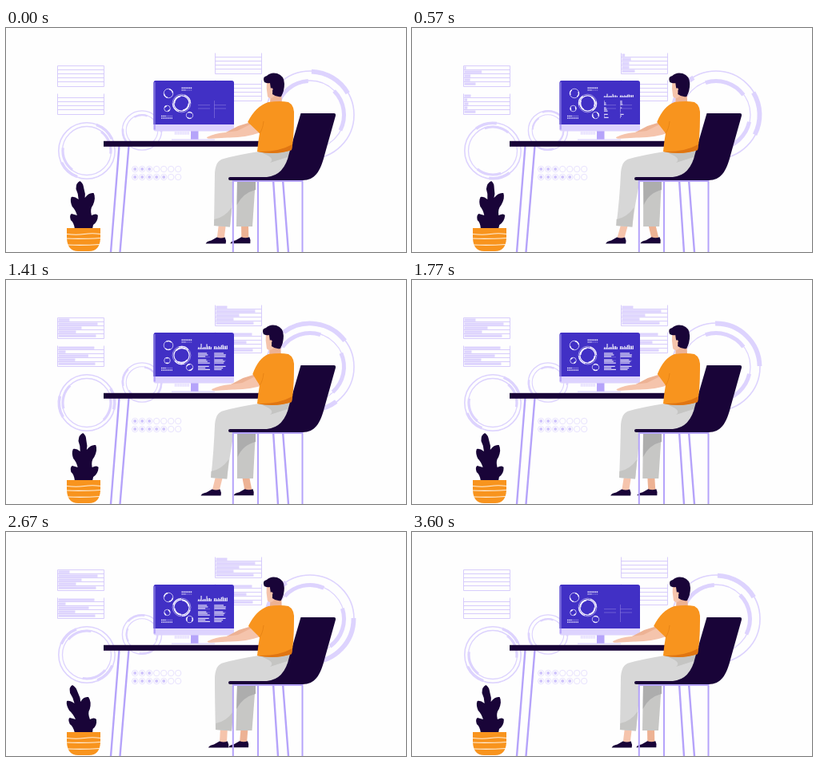
An HTML page with a canvas for the animation above (3630 ms loop, 500x281 px).

```html
<!DOCTYPE html>
<html lang="en">
<head>
<meta charset="utf-8">
<title>Desk work</title>
<style>
html, body { margin: 0; width: 100%; height: 100%; overflow: hidden; background: #fefefe; }
canvas { display: block; width: 500px; height: 281px; }
</style>
</head>
<body>
<canvas id="stage" width="500" height="281"></canvas>
<script>
const ctx = document.getElementById('stage').getContext('2d');
const LOOP = 3630, STEP = 30, CYCLE = 3600;
const DARK = '#190438', LILAC = '#ddd3fe', RULE = '#d3c7fb', VIOLET = '#b5a3fa';
const SCREEN = '#4130c5', INK = '#f4f1ff';
const SKIN = '#f5c4ac', SKIN_SHADE = '#edb294', ORANGE = '#f8941e';

// Cosine wave over one cycle that peaks at the given angle in degrees
const wave = (t, peak, harmonic = 1) => Math.cos((t / 10 * harmonic - peak) * Math.PI / 180);
// Pulls the two crossings of a swing downwards, so that it lingers at its low end
const linger = t => 1 + wave(t, 0, 2);
const legPose = t => .5 + .5 * wave(t, 95) - .1 * linger(t);
const armPose = t => .5 + .5 * wave(t, 130) - .08 * linger(t);
const plantSway = t => -1.5 + 8.5 * wave(t, 84);

function random(seed) {
  const v = Math.sin(seed * 12.9898) * 43758.5453;
  return v - Math.floor(v);
}

function grow(t, delay, length = 1200) {
  const s = Math.min(1, Math.max(0, (t - delay) / length));
  return s * s * (3 - 2 * s);
}

function rect(x, y, w, h, color) {
  ctx.fillStyle = color;
  ctx.fillRect(x, y, w, h);
}

function shape(path, color) {
  ctx.fillStyle = color;
  ctx.fill(new Path2D(path));
}

function line(path, color, width) {
  ctx.strokeStyle = color;
  ctx.lineWidth = width;
  ctx.stroke(new Path2D(path));
}

function ring(x, y, r, color, width, from = 0, span = 360) {
  ctx.strokeStyle = color;
  ctx.lineWidth = width;
  ctx.beginPath();
  ctx.arc(x, y, r, from * Math.PI / 180, (from + span) * Math.PI / 180);
  ctx.stroke();
}

function dot(x, y, r, color) {
  ctx.fillStyle = color;
  ctx.beginPath();
  ctx.arc(x, y, r, 0, 7);
  ctx.fill();
}

// A thin ring carrying evenly spaced thick arcs, each longer than the last by `stretch`
function dial(x, y, r, { thin, thick, from, span, count = 2, stretch = 0, color = LILAC }) {
  ring(x, y, r, color, thin);
  for (let i = 0; i < count; i++) {
    ring(x, y, r - .5, color, thick, from + i * 360 / count, span + i * stretch);
  }
}

function list(x, y, closed, widths, seed, t) {
  const rowY = i => Math.round(y + i * 5.1) + .5;
  widths.forEach((w, i) => {
    rect(x + 1, rowY(i) + 1, w * grow(t, 300 * random(seed + i)), 3.2, LILAC);
    line(`M${x} ${rowY(i + 1)}h58`, RULE, .9);
  });
  line(`M${x} ${rowY(0)}V${rowY(5)}M${x + 58} ${rowY(0)}V${rowY(5)}`, RULE, .9);
  if (closed) line(`M${x} ${rowY(0)}h58`, RULE, .9);
}

function drawLists(t) {
  const upper = [14, 49, 29, 22, 47], lower = [45, 9, 38, 21, 46];
  list(64.5, 47, true, upper, 1, t);
  list(64.5, 82, false, lower, 11, t);
  list(261.5, 31, false, upper, 21, t);
  list(261.5, 65, false, lower, 31, t);
}

function drawDials(t) {
  const turn = t / 10;
  dial(380, 109, 55, { thin: 1.6, thick: 5.8, from: turn - 88, span: 58, stretch: 32 });
  dial(380, 109, 43, { thin: 1.3, thick: 5, from: turn - 45, span: 72, count: 3 });
  dial(101, 154, 35.2, { thin: 1.6, thick: 3.6, from: -turn - 70, span: 45 });
  dial(101, 154, 30.5, { thin: 1.3, thick: 3.2, from: -turn - 53, span: 60 });
  dial(170, 128.5, 24.6, { thin: 1.4, thick: 2.6, from: -turn - 50, span: 55 });
  dial(170, 128.5, 19.8, { thin: 1.1, thick: 2.2, from: -turn + 60, span: 50 });
}

function drawRatings() {
  for (let row = 0; row < 2; row++) {
    for (let i = 0; i < 7; i++) {
      const x = 161.2 + i * 9, y = 177 + row * 10;
      ring(x, y, 3.7, '#e0d8fe', .75);
      if (i < 3 + row * 2) dot(x, y, 2, '#cfc4fb');
    }
  }
}

function drawChart(x, seed, amount) {
  for (let i = 0; i < 10; i++) {
    const h = (2 + 8 * random(seed + i) * Math.sin((i + 1) * .28)) * amount;
    rect(x + i * 1.75, 86.8 - h, 1.05, h, '#fff');
  }
  rect(x - .5, 86.5, 17.5 * amount, .5, '#d9d2ff');
}

function drawTextBlocks(x, seed, t) {
  line(`M${x} 96.7h15M${x} 101h15`, '#8c7ddd', .6);
  for (let i = 0; i < 9; i++) {
    const y = 91.4 + Math.floor(i / 3) * 8.2 + i % 3 * 2;
    const w = 8 + 7 * random(seed + i);
    rect(x, y, w * grow(t, 150 + 300 * random(seed + i + 50), 1000), 1.1, INK);
  }
}

function drawScreen(t) {
  const turn = t / 10, style = { thin: .7, thick: 1.3, color: INK };
  dial(203, 82, 5.8, { ...style, from: turn - 80, span: 75 });
  dial(201.5, 101, 3.8, { ...style, from: 20 - turn, span: 60 });
  dial(229.5, 109.5, 4.2, { ...style, from: turn + 60, span: 80 });
  dial(219.5, 94.5, 9.6, { ...style, thin: 1.2, thick: 1.8, from: -turn, span: 80 });
  dial(219.5, 94.5, 11.4, { ...style, thin: .5, from: turn - 70, span: 70 });

  for (let i = 0; i < 7; i++) {
    const fade = i < 3 ? INK : '#8e80df';
    rect(219.5 + i * 1.9, 74.5, 1.3, 1.5, INK);
    rect(219.5 + i * 1.9, 77.3, 1.3, 1.2, fade);
    rect(194 + i * 2.1, 109.8, 1.4, 1.3, fade);
    rect(194 + i * 2.1, 112.4, 1.4, 1.3, INK);
  }

  for (let column = 0; column < 2; column++) {
    const x = 240 + column * 20;
    drawChart(x, 60 + column * 20, grow(t, 50, 900));
    drawTextBlocks(x, 5 + column * 30, t);
  }
  line('M260.5 91V113', '#8c7ddd', .6);
}

function drawMonitor(t) {
  rect(231, 128, 9.5, 12, VIOLET);
  line('M207 140.2H261', LILAC, 1.2);
  for (let i = 0; i < 9; i++) rect(211 + i * 2.1, 130, 1.1, 3.8, LILAC);
  shape('M187 66H282Q285 66 285 69V127Q285 129.5 282 129.5H187Q184.5 129.5 184.5 127V69Q184.5 66 187 66Z', LILAC);
  shape('M187 66H282Q285 66 285 69V121H184.5V69Q184.5 66 187 66Z', SCREEN);
  rect(184.6, 68, 2.2, 53, '#7869da');
  rect(184.6, 121, 2.2, 6.5, VIOLET);
  drawScreen(t);
}

function drawPlant(bend) {
  const p = (x, y) => `${x + bend * Math.pow((252 - y) / 60, 1.25)} ${y}`;
  shape(`M${p(86, 252)}Q${p(85, 244)} ${p(81, 241)}Q${p(79, 235)} ${p(82, 233)}L${p(89, 235)}
    Q${p(87, 228)} ${p(83, 224)}Q${p(80, 217)} ${p(82, 212)}Q${p(86, 211)} ${p(91, 215)}
    Q${p(91, 208)} ${p(88, 202)}Q${p(88, 194)} ${p(93, 192)}Q${p(97, 194)} ${p(98, 202)}
    Q${p(100, 208)} ${p(99, 213)}Q${p(104, 206)} ${p(110, 207)}Q${p(113, 213)} ${p(109, 222)}
    Q${p(105, 227)} ${p(107, 235)}Q${p(113, 232)} ${p(115, 235)}Q${p(115, 243)} ${p(109, 247)}L${p(108, 252)}Z`, DARK);
  shape('M76 251H118V264Q117 280 104 280H90Q77 280 76 264Z', ORANGE);
  line('M76 258.5Q88 260 98 258.5T118 258.5M76 264Q92 265 118 263.5M77 272Q95 273 117 271.5', '#fff0dc', 1.1);
}

function drawFoot(x, y, cuff, skin) {
  shape(`M${cuff + 6} 246H${cuff + 15}L${x + 23} ${y - 6}H${x + 14}Z`, skin);
  shape(`M${x} ${y}Q${x + 1} ${y - 3} ${x + 7} ${y - 4}L${x + 14} ${y - 8}Q${x + 19} ${y - 6} ${x + 24} ${y - 8}
    Q${x + 26} ${y - 4} ${x + 25} ${y}Z`, DARK);
}

function drawLegs(step) {
  const cuff = 262 - 8 * step, backCuff = 287.5 + 2 * step;

  drawFoot(278 + 9 * step, 270.2, backCuff, SKIN_SHADE);
  shape(`M289 190H312L${backCuff + 20} 249H${backCuff}Z`, '#c7c7c5');
  shape(`M289 190H312V203Q296 207 ${backCuff + .6} 222Z`, '#adadad');

  drawFoot(253 - 13 * step, 270.6, cuff, SKIN);
  shape(`M316 155Q290 159 272 164Q262 166 261 182Q${261 - step * 1.5} 212 ${cuff} 248L${cuff + 20} 249.5
    Q${cuff + 23} 222 285 191H340L358 165V153Z`, '#d7d7d7');
  shape(`M${cuff + .3} 240Q${cuff + 13} 238 ${cuff + 22.3} 225L${cuff + 20} 249.5L${cuff} 248Z`, '#c5c5c3');
  shape('M318 156Q338 163 330 169L358 160V153Z', '#c5c5c3');
}

function drawTable() {
  line('M141.5 148L131 281M153.5 148L142.5 281M334 190L340 281M346 190L353 281', VIOLET, 2.4);
  rect(122, 141.8, 194, 7, DARK);
}

function drawChair() {
  line('M283.8 281V192H370.5V281M315 192V281', VIOLET, 2);
  shape('M368.5 107H410Q412.5 107 412 110L398 160C393 180 386 191 371 191H280Q278 191 278 189T280 187H326Q348 185 354 157Z', DARK);
}

function drawHead(shift) {
  ctx.save();
  ctx.translate(shift, 0);
  shape('M331 78H344L345 95H330Z', SKIN_SHADE);
  shape('M326 66Q325 76 327 86Q330 90 335 86L341 76V65Z', SKIN);
  shape(`M323 68Q320 61 326 60Q331 55 339 57Q348 60 348 70Q348 79 344 86Q338 87 333 83
    Q334 77 331 76L330 69Q327 70 323 68Z`, DARK);
  dot(332, 77, 1.7, SKIN);
  ctx.restore();
}

function drawPerson(reach) {
  const hand = 251 + 7 * reach, elbow = 302 + 7 * reach;

  // Far arm, then near arm with its hand
  shape(`M${elbow + 4} 118L${elbow - 12} 123L${hand + 20} 133L${hand + 15} 138L${elbow + 2} 131Z`, SKIN_SHADE);
  shape(`M${elbow + 3} 121L${elbow - 13} 129L${hand + 23} 131Q${hand + 10} 132 ${hand} 137
    Q${hand - 1} 139 ${hand + 5} 138.8L${hand + 26} 137.5Q${hand + 47} 138 ${elbow + 16} 131Z`, SKIN);

  drawHead(-1.2 * reach);
  shape(`M328 93Q343 91 353 93Q361 97 360 111Q360 138 357 153Q337 160 314 155Q315 143 317 132
    L${elbow} 118Q${312 + 4 * reach} 98 328 93Z`, ORANGE);
  shape('M314 155Q340 156 358 146L357 153Q337 160 314 155Z', '#df7512');
  line('M317 132Q321 127 322 117', '#e48114', .8);
}

function draw(t) {
  rect(0, 0, 500, 281, '#fefefe');
  drawLists(t);
  drawDials(t);
  drawRatings();
  drawMonitor(t);
  drawPlant(plantSway(t));
  drawTable();
  drawLegs(legPose(t));
  drawChair();
  drawPerson(armPose(t));
}

const start = performance.now();
function tick() {
  const elapsed = (performance.now() - start) % LOOP;
  draw(Math.floor(elapsed / STEP) * STEP % CYCLE);
  requestAnimationFrame(tick);
}
tick();
</script>
</body>
</html>
```
